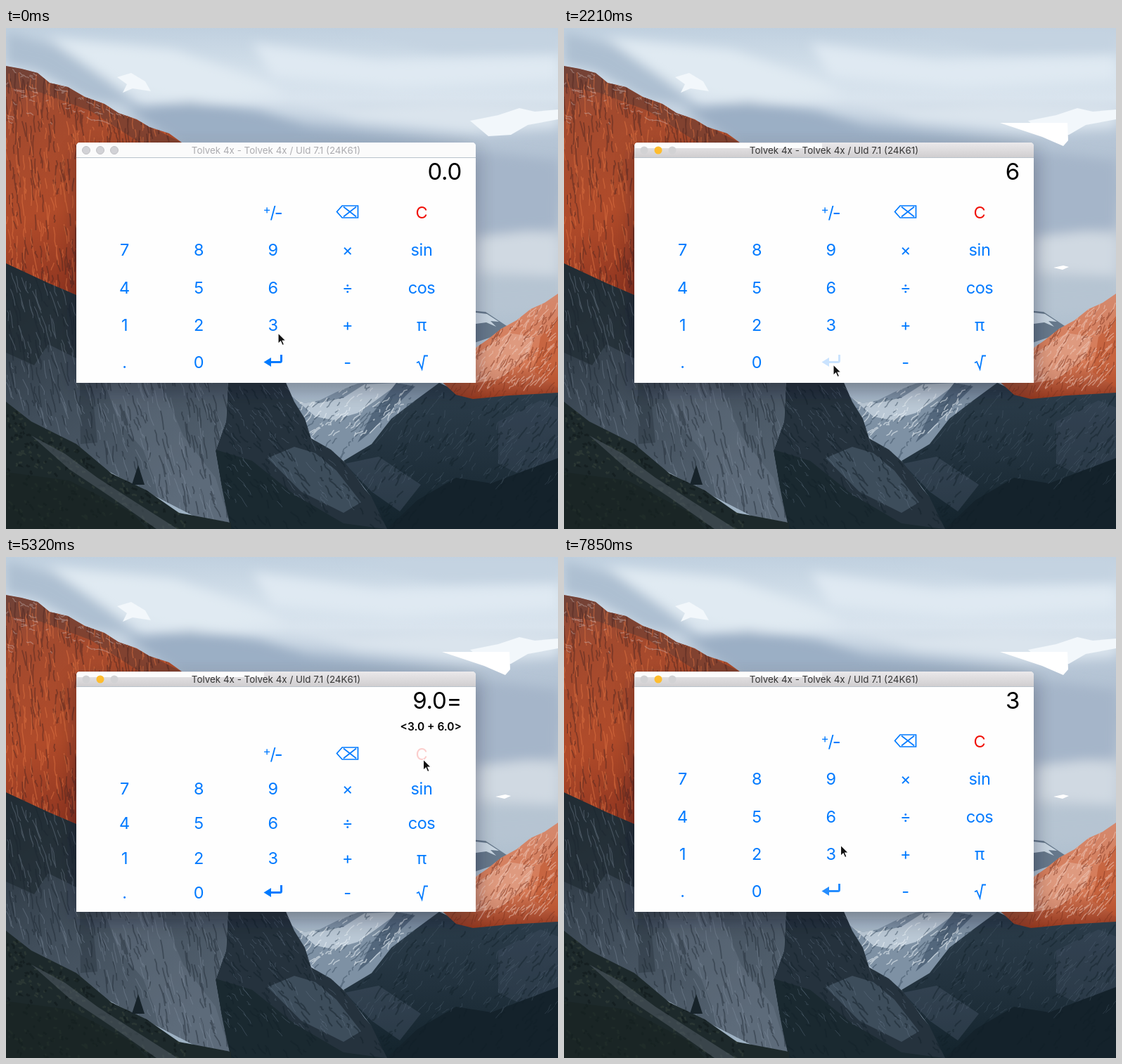
These frames come from a looping animation (785 px wide and 713 px high, 8 s). An HTML page:

```html
<!DOCTYPE html>
<html lang="en">
<head>
<meta charset="utf-8">
<title>Calculator</title>
<style>
html, body { margin: 0; width: 100%; height: 100%; overflow: hidden; }
svg { display: block; width: 785px; height: 713px; font-family: Inter, Roboto, sans-serif; }
.key { font-size: 23.5px; letter-spacing: -.4px; text-anchor: middle; fill: #007aff; }
.line { fill: none; stroke: #007aff; }
</style>
</head>
<body>
<svg id="stage" viewBox="0 0 785 713" xmlns="http://www.w3.org/2000/svg">
<defs>
  <linearGradient id="sky" x2="0" y2="1">
    <stop offset="0" stop-color="#c0d0df"/><stop offset=".08" stop-color="#d2dfea"/>
    <stop offset=".14" stop-color="#d9e4ee"/><stop offset=".2" stop-color="#b9c8d8"/>
    <stop offset=".32" stop-color="#aabacc"/><stop offset=".44" stop-color="#c4ced9"/>
    <stop offset=".6" stop-color="#b0c0cf"/><stop offset="1" stop-color="#9cb0c2"/>
  </linearGradient>
  <linearGradient id="fire" x2=".25" y2="1">
    <stop offset="0" stop-color="#8a4a3a"/><stop offset=".25" stop-color="#a34a2e"/>
    <stop offset=".65" stop-color="#b04b2a"/><stop offset="1" stop-color="#8f3520"/>
  </linearGradient>
  <linearGradient id="glow" x2="0" y2="1">
    <stop offset="0" stop-color="#d4896e"/><stop offset=".65" stop-color="#d67a56"/><stop offset="1" stop-color="#94381f"/>
  </linearGradient>
  <linearGradient id="rock" x2=".6" y2="1">
    <stop offset="0" stop-color="#222d36"/><stop offset=".5" stop-color="#414e5b"/><stop offset="1" stop-color="#53616f"/>
  </linearGradient>
  <linearGradient id="dusk" x2="0" y2="1">
    <stop offset="0" stop-color="#2c3d4b"/><stop offset=".5" stop-color="#22323e"/><stop offset="1" stop-color="#13232c"/>
  </linearGradient>
  <linearGradient id="bar" x2="0" y2="1">
    <stop offset="0" stop-color="#ebe9eb"/><stop offset="1" stop-color="#d0ced0"/>
  </linearGradient>
  <filter id="soft" x="-50%" y="-50%" width="200%" height="200%"><feGaussianBlur stdDeviation="8"/></filter>
  <filter id="shade" x="-20%" y="-20%" width="140%" height="150%"><feGaussianBlur stdDeviation="14"/></filter>
  <clipPath id="cFire"><path id="pFire" d="M0 54L22 58 45 64 62 78 88 84 112 98 140 108 160 121 186 130 204 141 232 150 250 163V385H100L60 364 0 337Z"/></clipPath>
  <clipPath id="cRock"><path id="pRock" d="M0 335L60 363 100 380V500H316L313 560 298 602 306 650 320 704 270 696 190 655 90 600 0 550Z"/></clipPath>
  <clipPath id="cWood"><path id="pWood" d="M0 532L36 560 100 592 150 634 200 658 246 690 320 704V713H0Z"/></clipPath>
  <clipPath id="cMid"><path id="pMid" d="M316 500H396L410 532 425 556 434 584 462 600 486 622 510 656 540 690 544 713H320L306 650 298 602 313 560Z"/></clipPath>
  <clipPath id="cSnow"><path id="pSnow" d="M402 522L424 534 446 530 470 518 500 506 540 500H625L590 535 550 560 520 592 480 616 452 600 428 574Z"/></clipPath>
  <clipPath id="cDusk"><path id="pDusk" d="M480 616L520 592 548 556 582 530 616 505 650 520 785 515V713H542L520 668Z"/></clipPath>
  <clipPath id="cGlow"><path id="pGlow" d="M785 378L766 391 746 400 726 416 704 428 684 444 668 455V500H616L640 522 664 528 715 523 785 519Z"/></clipPath>
</defs>

<rect width="785" height="713" fill="url(#sky)"/>
<g filter="url(#soft)">
  <path d="M0 5L70 24 150 78 200 118 120 104 40 60 0 52Z" fill="#adbfd1"/>
  <path d="M60 14L240 32 360 74 400 95 260 110 160 84Z" fill="#e0eaf2"/>
  <path d="M170 116L260 105 360 118 430 140 540 152 680 168H250Z" fill="#9bafc5"/>
  <path d="M350 22L530 46 785 40V75L560 86 380 70Z" fill="#dfe9f2"/>
  <path d="M480 0H785V34L620 36Z" fill="#c4d3e1"/>
  <path d="M400 100L500 112 620 104 785 112V142L660 150 500 132Z" fill="#dae4ed"/>
  <path d="M668 175L785 190V285L668 295Z" fill="#a5b5c9"/>
  <path d="M675 300L740 290 785 296V352L670 344Z" fill="#d0d9e2"/>
  <path d="M668 360L785 355V395L668 405Z" fill="#b6c4d2"/>
</g>
<g fill="#f2f7fb">
  <path d="M158 70L178 64 198 76 206 90 180 86 166 92 172 80Z"/>
  <path d="M660 132L700 124 730 114 752 119 785 116V130L742 138 718 152 686 154Z"/>
</g>
<g id="patch" fill="#fff">
  <path d="M620 135H716L717 160 710 168 680 155Z"/>
  <path d="M696 341l14-3 8 2-9 4Z"/>
</g>
<path d="M660 402L682 404 712 424 690 440 660 450Z" fill="#66788b"/>
<path d="M668 405l16 2 17 11-12-1 8 8-14-6-15 2Z" fill="#c8d5e1"/>
<use href="#pFire" fill="url(#fire)"/>
<g clip-path="url(#cFire)">
  <path d="M0 54L45 62 88 82 160 118 250 163H190L120 118 50 92 0 84Z" fill="#5d3a35" opacity=".5"/>
  <g id="fireTex"></g>
</g>
<use href="#pRock" fill="url(#rock)"/>
<g clip-path="url(#cRock)">
  <path d="M0 335L100 380V470L60 450 40 480 0 462Z" fill="#202b33" opacity=".7"/>
  <path d="M140 505L218 500 252 580 298 640 320 710 230 690 195 600 160 560Z" fill="#748292" opacity=".3"/>
  <path d="M105 505L122 510 130 590 106 592Z" fill="#202c36" opacity=".35"/>
  <g id="rockTex"></g>
</g>
<use href="#pSnow" fill="#7e91a4"/>
<g clip-path="url(#cSnow)">
  <path d="M402 520L445 534 480 526 510 507 560 505 526 530 500 548 465 558 440 553Z" fill="#bac8d5"/>
  <path d="M555 505L582 510 542 550 515 578 500 590 520 550Z" fill="#53677c"/>
  <g id="snowTex"></g>
</g>
<use href="#pMid" fill="#25323d"/>
<g clip-path="url(#cMid)">
  <path d="M372 612L410 596 440 605 470 630 505 675 480 690 420 660Z" fill="#5b6d7f" opacity=".45"/>
  <path d="M298 600L350 616 410 664 480 705 540 713H318Z" fill="#1a2930"/>
  <g id="midTex"></g>
</g>
<use href="#pDusk" fill="url(#dusk)"/>
<g clip-path="url(#cDusk)">
  <path d="M482 620L530 610 590 650 560 688 520 660Z" fill="#506072" opacity=".35"/>
  <path d="M700 560L760 530 785 540V615L740 640 700 620Z" fill="#455568" opacity=".3"/>
  <path d="M542 713L585 672 640 640 690 648 785 612V713Z" fill="#14222b"/>
  <g id="duskTex"></g>
</g>
<use href="#pWood" fill="#1d292b"/>
<g clip-path="url(#cWood)">
  <g id="woodTex"></g>
  <path d="M36 580L84 606 130 640 186 676 244 713H214L150 668 90 628Z" fill="#525e67" opacity=".55"/>
  <path d="M0 632L90 644 180 690 200 713H0Z" fill="#182322" opacity=".6"/>
</g>
<path d="M188 622l9 28h-18Z" fill="#17232a"/>
<use href="#pGlow" fill="url(#glow)"/>
<g clip-path="url(#cGlow)">
  <path d="M668 464L715 434 752 440 742 470 700 500 668 505Z" fill="#e8b6a2" opacity=".5"/>
  <path d="M785 410L760 440 752 490 785 512Z" fill="#bf5630" opacity=".6"/>
  <g id="glowTex"></g>
</g>

<rect id="shadow" x="100" y="175" width="568" height="340" filter="url(#shade)" fill="#07111e"/>
<path d="M100 505V168a5 5 0 0 1 5-5H663a5 5 0 0 1 5 5V505Z" fill="#fefefe"/>
<path id="titleBar" d="M100 184V168a5 5 0 0 1 5-5H663a5 5 0 0 1 5 5V184Z"/>
<rect id="strip" x="101" y="164" height="7" fill="#fcfcfc"/>
<path d="M100 184.5H668" stroke="#b9c3cc"/>
<g id="lights"><circle cx="114" cy="174" r="5.5"/><circle cx="134" cy="174" r="5.5"/><circle cx="154" cy="174" r="5.5"/></g>
<text id="title" x="384" y="179" font-size="13.4" text-anchor="middle">Tolvek 4x - Tolvek 4x / Uld 7.1 (24K61)</text>
<text id="display" x="648" y="216" font-size="33" text-anchor="end" letter-spacing="-.3"></text>
<text id="formula" x="648" y="247" font-size="15.5" font-weight="600" text-anchor="end">&lt;3.0 + 6.0&gt;</text>
<g id="keys"></g>
<path id="cursor" d="M0 0V15.3L3.6 12 6.1 17.6 8.6 16.5 6.2 11.1H11Z" fill="#111" stroke="#fff" stroke-width="1.1"/>
</svg>
<script>
const $ = id => document.getElementById(id);
const LOOP = 8000;

// Wallpaper texture: seeded short strokes inside each clipped shape
let seed = 7;
const rand = () => (seed = seed * 16807 % 2147483647) / 2147483647;
function streaks(id, color, count, [x, y, w, h], [dx, dy], width, opacity) {
  let d = '';
  for (let i = 0; i < count; i++) {
    const k = .3 + rand();
    const px = x + rand() * w, py = y + rand() * h;
    d += `M${px.toFixed(1)} ${py.toFixed(1)}`;
    for (let j = 0; j < 3; j++)
      d += `l${(dx * k + (rand() - .5) * 4).toFixed(1)} ${(dy * k + (rand() - .5) * 4).toFixed(1)}`;
  }
  $(id).insertAdjacentHTML('beforeend',
    `<path d="${d}" fill="none" stroke="${color}" stroke-width="${width}" opacity="${opacity}"/>`);
}
const fireBox = [0, 60, 250, 310], rockBox = [0, 340, 320, 350];
streaks('fireTex', '#4a241f', 330, fireBox, [.6, 9], 1.8, .45);
streaks('fireTex', '#e27443', 330, fireBox, [.6, 8], 1.4, .5);
streaks('fireTex', '#cfc4c4', 110, [0, 55, 230, 80], [3, 1], 1.2, .4);
streaks('rockTex', '#1a252e', 350, rockBox, [2, 9], 1.8, .4);
streaks('rockTex', '#8695a5', 330, rockBox, [2.5, 9], 1.1, .35);
streaks('snowTex', '#3c5064', 90, [410, 505, 190, 100], [-3, 3], 1.6, .5);
streaks('snowTex', '#eaf0f5', 80, [415, 508, 160, 70], [-3, 3], 1.4, .6);
streaks('midTex', '#131f28', 180, [300, 505, 230, 205], [3, 4], 2, .45);
streaks('midTex', '#718294', 150, [310, 505, 190, 170], [3, 4], 1, .35);
streaks('duskTex', '#627286', 170, [490, 515, 300, 130], [-3, 4], 1, .28);
streaks('duskTex', '#111e27', 180, [490, 515, 300, 190], [-3, 4], 2, .4);
streaks('woodTex', '#39453c', 230, [0, 540, 260, 170], [1, 1], 2.6, .5);
streaks('woodTex', '#10191a', 200, [0, 540, 260, 170], [1, 1], 3, .55);
streaks('glowTex', '#f2d0c2', 150, [665, 390, 120, 115], [-3, 4], 1.3, .5);
streaks('glowTex', '#80341f', 170, [620, 400, 165, 125], [-2, 4], 1.4, .5);

// Keypad: each key is a group centred on its grid cell
const cols = [168.5, 274, 379.5, 485.5, 591];
const shortRows = [262, 315.5, 369, 422, 475], tallRows = [280, 329.5, 378.5, 428, 477];
const art = {
  sign: '<g class="key"><text x="-8.5" y="1.5" style="font-size:17px">+</text>' +
    '<text x="0" y="9">/</text><text x="8" y="9.5" style="font-size:26px">-</text></g>',
  back: '<path class="line" stroke-width="1.7" d="M-15-.5L-7.5-9H15V8H-7.5ZM-5.5-7.5L12.5 6.5M12.5-7.5L-5.5 6.5"/>',
  enter: '<path class="line" stroke-width="3" d="M12-10V-1.5Q12 .5 10 .5H-6"/><path d="M-13 .5L-2.5-6V7Z" fill="#007aff"/>',
  root: '<path class="line" stroke-width="1.8" d="M-7 1.5L-4 0 .5 10.5 4-8.5H9"/>'
};
const layout = [
  '  sign back C', '7 8 9 × sin', '4 5 6 ÷ cos', '1 2 3 + π', '. 0 enter - root'
].map(row => row.split(' '));
const keys = [];
layout.forEach((names, row) => names.forEach((name, col) => {
  if (!name) return;
  const el = document.createElementNS('http://www.w3.org/2000/svg', 'g');
  el.innerHTML = art[name] ||
    `<text class="key" y="8.5"${name === 'C' ? ' style="fill:#f01008"' : ''}>${name}</text>`;
  $('keys').append(el);
  keys.push({ el, name, row, x: cols[col] });
}));

// Ticks last 150 ms, apart from the shorter ones listed here
const quick = [0, 2, 8, 11, 17, 23, 25, 35, 46, 51];
const starts = [0];
for (let i = 0; i < 53; i++) starts.push(starts[i] + (quick.includes(i) ? 140 : 150));

// [key, tick down, tick up]
const presses = [
  ['6', 8, 8], ['enter', 15, 15], ['3', 23, 23], ['+', 28, 28],
  ['C', 35, 37], ['C', 40, 41], ['3', 47, 47], ['enter', 51, 51]
];
const readouts = [[0, '0.0'], [8, '6'], [23, '3'], [28, '9.0='], [37, '0.0'], [47, '3']];
// [tick, x, y]
const path = [
  [0, 387, 434], [5, 383, 367], [8, 383, 367], [13, 383, 479], [15, 383, 479],
  [21, 384, 423], [23, 384, 423], [26, 490.5, 419], [28, 490.5, 419],
  [34, 593, 290], [36, 593.5, 288], [38, 593.5, 287], [40, 592.5, 272], [42, 592.5, 272],
  [46, 384, 421], [47, 383, 421], [50, 383, 478], [51, 383, 478], [53, 393.5, 410]
];
const smooth = u => u * u * (3 - 2 * u);

function cursorAt(n) {
  const i = Math.max(1, path.findIndex(p => p[0] >= n));
  const [a, ax, ay] = path[i - 1], [b, bx, by] = path[i];
  const u = smooth((n - a) / (b - a));
  return [ax + (bx - ax) * u, ay + (by - ay) * u];
}

function alphaOf(name, n) {
  const last = presses.filter(p => p[0] === name && p[1] <= n).pop();
  if (!last) return 1;
  const since = Math.max(0, starts[n] - starts[last[2]]);
  return .2 + .8 * smooth(Math.min(1, since / 400));
}

function render(t) {
  const n = starts.filter(s => s <= t).length - 1;
  const active = n >= 8, tall = n >= 28 && n < 37;
  const rows = tall ? tallRows : shortRows;
  for (const k of keys) {
    k.el.setAttribute('transform', `translate(${k.x} ${rows[k.row]})`);
    k.el.setAttribute('opacity', alphaOf(k.name, n));
  }
  $('display').textContent = readouts.filter(r => r[0] <= n).pop()[1];
  $('formula').style.display = tall ? '' : 'none';
  $('cursor').setAttribute('transform', `translate(${cursorAt(n)})`);
  $('titleBar').setAttribute('fill', active ? 'url(#bar)' : '#fbfbfb');
  $('strip').setAttribute('width', !active ? 0 : n < 15 ? 566 : 266);
  $('title').setAttribute('fill', active ? '#343434' : '#acacb0');
  $('shadow').setAttribute('opacity', active ? .38 : .3);
  $('patch').style.display = active ? '' : 'none';
  [...$('lights').children].forEach((c, i) => {
    c.setAttribute('fill', !active ? '#d2d2d6' : i === 1 ? '#ffbd2e' : '#d2d2d4');
    c.setAttribute('stroke', active ? 'none' : '#c2c2c6');
  });
}

const begin = performance.now();
function loop() {
  render((performance.now() - begin) % LOOP);
  requestAnimationFrame(loop);
}
render(0);
requestAnimationFrame(loop);
</script>
</body>
</html>
```
